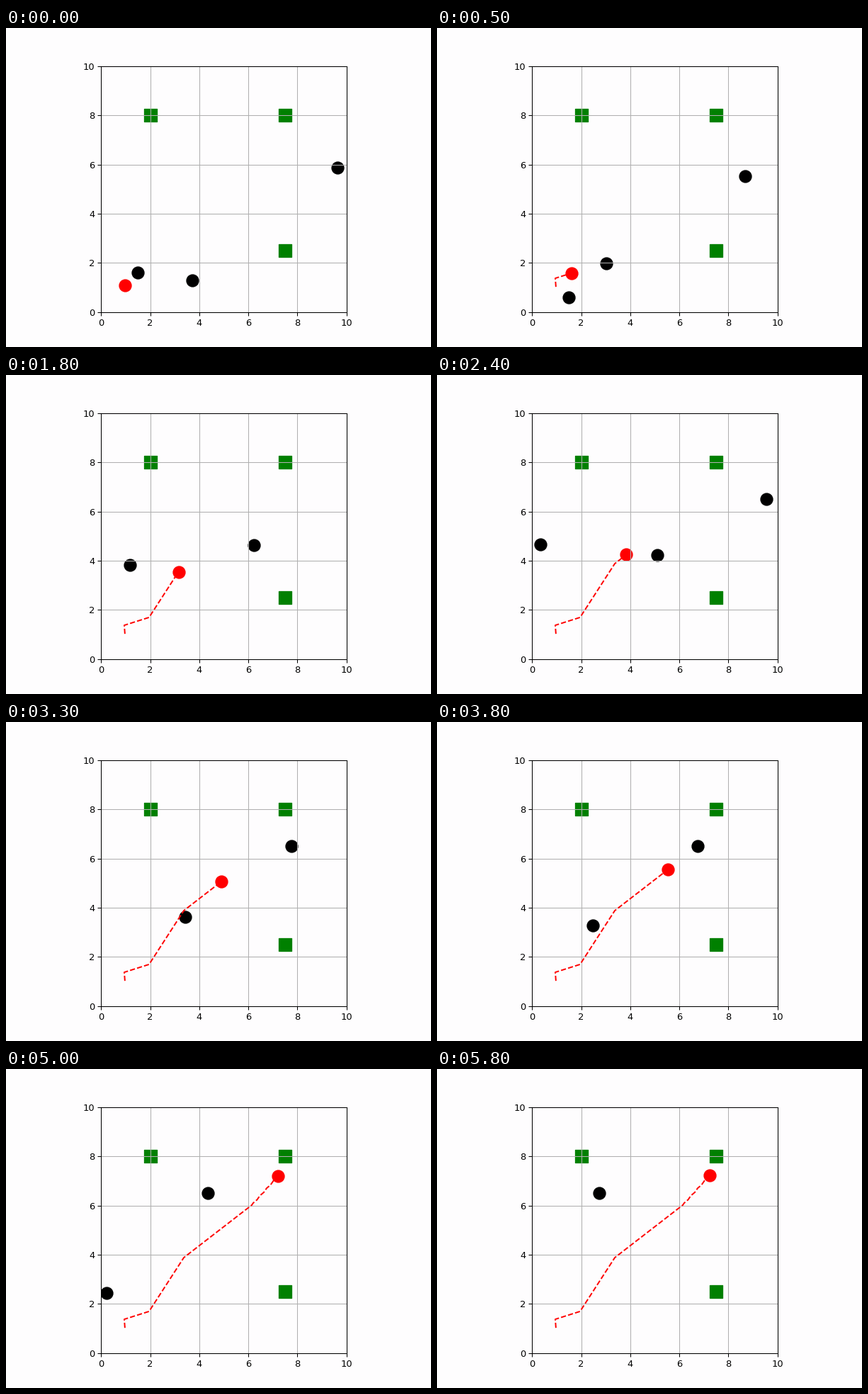
Animation of 600 by 450 pixels, one loop 5900 ms. Source, as a matplotlib script:

```python
import numpy as np
import matplotlib.pyplot as plt
from matplotlib.animation import FuncAnimation

FRAMES = 59
FAST, SLOW = 0.1975, 0.149      # robot speed, units per step
LEAD = 0.069                    # distance covered before the first step
PAPER = "#fefdfe"

WAYPOINTS = np.array([(0.97, 1.02), (0.945, 1.37), (1.955, 1.69),
                      (3.37, 3.88), (6.14, 6.02), (7.236, 7.224)])
GOALS = np.array([(2, 8), (7.5, 8), (7.5, 2.5)])

# Obstacles drift at a shared speed, each along its own heading
OBSTACLES = np.array([(1.494, 1.602), (3.727, 1.276),
                      (9.62, 5.873), (14.345, 6.5)])
HEADINGS = np.radians([-90, 135, 200, 180])
DRIFT = 0.2 * np.column_stack([np.cos(HEADINGS), np.sin(HEADINGS)])

legs = np.hypot(*np.diff(WAYPOINTS, axis=0).T)
marks = np.append(0, np.cumsum(legs))

steps = np.arange(1, FRAMES)
speed = np.where((steps > 20) & (steps <= 37), SLOW, FAST)
travelled = np.minimum(LEAD + np.append(0, np.cumsum(speed)), marks[-1])


def route(dist):
    """Points on the route, with a small zigzag along the last leg."""
    xy = np.column_stack([np.interp(dist, marks, c) for c in WAYPOINTS.T])
    u = np.clip((dist - marks[-2]) / legs[-1], 0, 1)
    return xy + np.outer(np.sin(8 * np.pi * u), (-0.01, 0.01))


def trail(dist):
    passed = marks[marks < dist]
    zigzag = np.arange(marks[-2], dist, legs[-1] / 16)
    return route(np.unique(np.concatenate([passed, zigzag, [dist]])))


fig, ax = plt.subplots(figsize=(6.4, 4.8), dpi=93.75, facecolor=PAPER)
ax.set_facecolor(PAPER)
ax.grid(True)

ax.scatter(*GOALS.T, s=180, c="green", marker="s")
robot = ax.scatter([], [], s=170, c="red")
obstacles = ax.scatter([], [], s=170, c="black")
line, = ax.plot([], [], "r--")
ax.set(xlim=(0, 10), ylim=(0, 10), aspect="equal",
       xticks=range(0, 11, 2), yticks=range(0, 11, 2))


def update(i):
    points = trail(travelled[i])
    robot.set_offsets(points[-1])
    obstacles.set_offsets(OBSTACLES + i * DRIFT)
    line.set_data(*points.T)
    return robot, obstacles, line


anim = FuncAnimation(fig, update, frames=FRAMES, interval=100, repeat=True)
plt.show()
```
